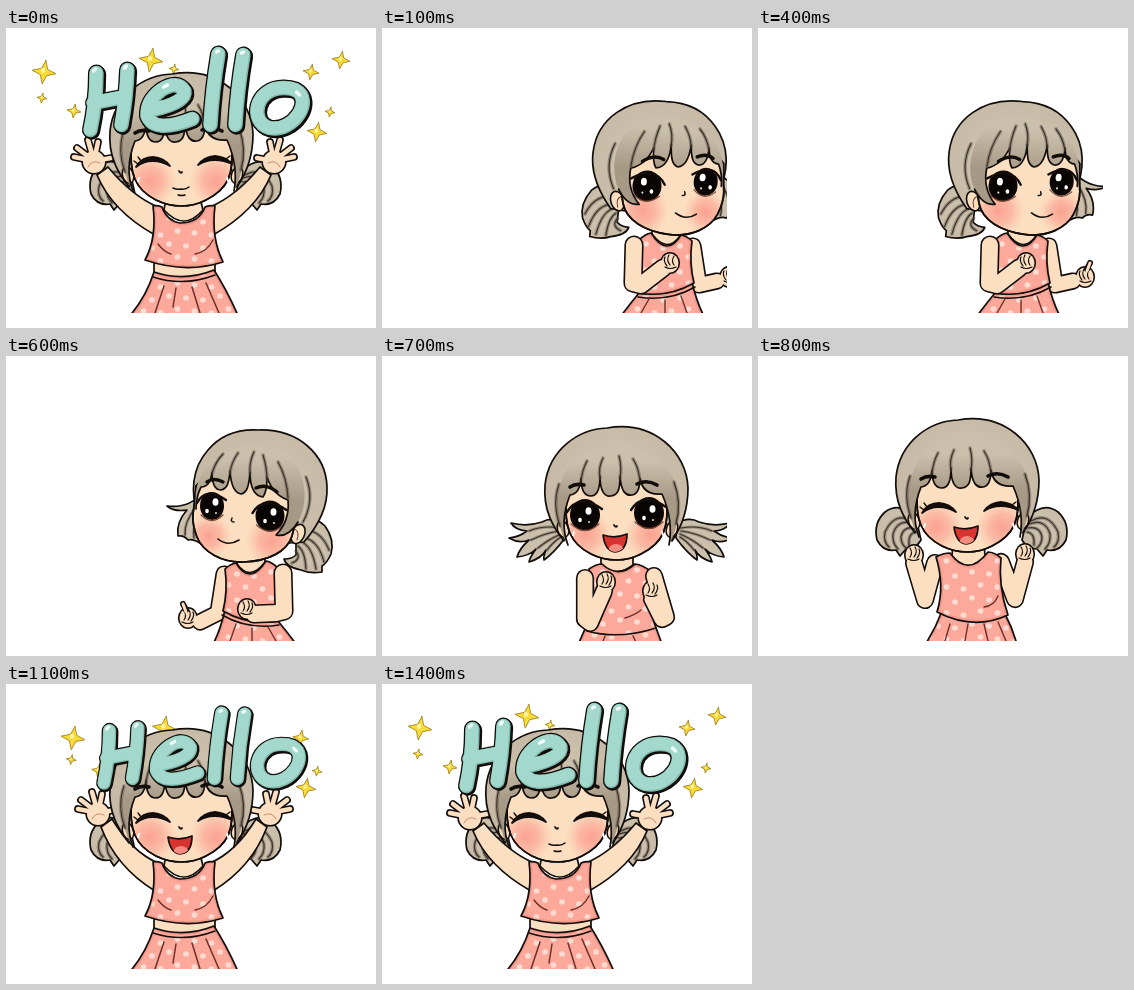
An HTML page with a canvas that plays this animation: 370x300 px, repeating every 2 s.

```html
<!DOCTYPE html>
<html lang="en">
<head>
<meta charset="utf-8">
<title>Hello</title>
<style>
html, body { margin: 0; width: 100%; height: 100%; overflow: hidden; background: #fff; }
canvas { display: block; width: 370px; height: 300px; }
</style>
</head>
<body>
<canvas id="stage" role="img" aria-label="A girl says Hello"></canvas>
<script>
const canvas = document.getElementById('stage');
const c = canvas.getContext('2d');
const dpr = window.devicePixelRatio || 1;
canvas.width = 370 * dpr;
canvas.height = 300 * dpr;

const INK = '#120d0a', SKIN = '#fcdfc1', PINK = '#fca99b', FOLD = '#6b3028';
const HAIR = '#cbc0ac', SHADE = '#a09482', STRAND = '#3c332b', MINT = '#a3d8cc';

function shape(d, fill, line = INK, w = 1.7) {
  const p = new Path2D(d);
  if (fill) { c.fillStyle = fill; c.fill(p); }
  if (line) { c.strokeStyle = line; c.lineWidth = w; c.stroke(p); }
}
const line = (d, w = 1.2, color = INK) => shape(d, null, color, w);

// A soft shadow with a fine dark core
function strands(d, soft = 3.6) {
  line(d, soft, 'rgba(85,74,62,.42)');
  line(d, 1.2, STRAND);
}

function oval(x, y, rx, ry, fill, ink, tilt = 0) {
  c.beginPath();
  c.ellipse(x, y, rx, ry, tilt, 0, 7);
  if (fill) { c.fillStyle = fill; c.fill(); }
  if (ink) { c.strokeStyle = ink; c.lineWidth = 1.6; c.stroke(); }
}

function group(draw, dx = 0, dy = 0) {
  c.save();
  c.translate(dx, dy);
  draw();
  c.restore();
}

function mirror(sum, draw) {
  c.save();
  c.transform(-1, 0, 0, 1, sum, 0);
  draw();
  c.restore();
}

function both(sum, draw) { draw(); mirror(sum, draw); }

function clipped(d, draw) {
  c.save();
  c.clip(new Path2D(d));
  draw();
  c.restore();
}

function hairTone(x, y, r) {
  const g = c.createRadialGradient(x, y, r * 0.55, x, y, r);
  g.addColorStop(0, HAIR);
  g.addColorStop(0.75, '#c6baa6');
  g.addColorStop(1, SHADE);
  return g;
}

function fringe(edge, rest, top, bottom) {
  const g = c.createLinearGradient(0, top, 0, bottom);
  g.addColorStop(0, HAIR);
  g.addColorStop(1, '#a69a86');
  shape(edge + rest, g, null);
  line(edge, 1.7);
}

function blush(x, y, r) {
  const g = c.createRadialGradient(x, y, 0, x, y, r);
  g.addColorStop(0, 'rgba(250,138,126,.72)');
  g.addColorStop(0.5, 'rgba(250,148,134,.5)');
  g.addColorStop(1, 'rgba(252,180,160,0)');
  oval(x, y, r, r, g);
}

function face(d, spots) {
  shape(d, SKIN);
  clipped(d, () => spots.forEach(s => blush(...s)));
  line(d, 1.7);
}

function cloth(d) {
  shape(d, PINK, null);
  clipped(d, () => {
    for (let row = 0; row < 9; row++)
      for (let col = 0; col < 18; col++)
        oval(112 + col * 17 + row % 2 * 8.5, 190 + row * 13 + col % 3 * 2, 2.9, 2.8, '#fddbd0');
    line(d, 5, 'rgba(222,110,98,.3)');
  });
  line(d, 1.7);
}

// Limbs are inked wide first, then filled with skin
function limb(pts, w, fist) {
  for (const [color, extra] of [[INK, 3.2], [SKIN, 0]]) {
    c.beginPath();
    pts.forEach(p => c.lineTo(...p));
    c.strokeStyle = color;
    c.lineWidth = w + extra;
    c.stroke();
    if (fist) oval(fist[0], fist[1], 8.5 + extra / 2, 9.5 + extra / 2, color);
  }
  if (!fist) return;
  group(() => {
    line('M-4 -7 Q-1 -2 -4 2 M1 -8 Q4 -3 0 2 M5 -6 Q7 -2 3 3 M-6 4 Q0 7 5 4', 1.2);
  }, ...fist);
}

function openEye(x, y, rx, ry) {
  const g = c.createRadialGradient(x, y - 2, rx * 0.6, x, y, ry);
  g.addColorStop(0, '#070403');
  g.addColorStop(0.8, '#0f0907');
  g.addColorStop(1, '#4a2b1e');
  oval(x, y, rx, ry - 1, g);
  oval(x + 3.5, y - 4, 3, 3.8, '#fff');
  oval(x - 5, y + 5, 1.8, 2.2, '#fff');
  oval(x + 4, y + 7, 1.1, 1.1, '#d8d0cc');
  line(`M${x - rx - 3} ${y - 3} Q${x - 6} ${y - ry - 5} ${x + rx + 2} ${y - 6}`, 2.4);
  line(`M${x - rx + 1} ${y + 9} Q${x} ${y + ry + 5} ${x + rx - 1} ${y + 9}`, 1.2, '#7a4a38');
}

function openMouth(x, y) {
  const d = `M${x - 12} ${y - 7} Q${x} ${y - 3} ${x + 12} ${y - 8} Q${x + 12} ${y + 9} ${x} ${y + 10} Q${x - 10} ${y + 9} ${x - 12} ${y - 7} Z`;
  shape(d, '#d8332f');
  clipped(d, () => oval(x + 1, y + 8, 7.5, 6, '#f58b80'));
}

/* ---------- front view ---------- */
function tail(fly) {
  if (fly) {
    group(() => {
      shape('M210 172 Q198 164 187 170 Q172 175 156 171 Q160 178 172 179 Q164 185 154 186 Q164 192 174 188 Q164 197 162 205 Q174 204 181 197 Q175 205 174 210 Q187 206 191 198 Q188 205 189 208 Q199 201 210 186 Z', HAIR);
      strands('M205 176 Q188 173 174 179 M205 179 Q190 181 176 188 M206 182 Q194 187 183 196 M206 185 Q198 190 192 198', 3);
    }, -52, -12);
    return;
  }
  shape('M158 162 Q142 145 127 156 Q115 167 119 184 Q125 196 138 194 L142 200 L148 193 Q158 193 163 184 Z', hairTone(142, 172, 29));
  strands('M154 165 Q137 155 127 176 Q125 186 131 191 M156 168 Q140 162 135 178 Q134 187 140 193 M157 172 Q145 170 143 181 Q143 188 148 192 M158 176 Q150 177 151 189');
}
const tails = fly => both(427, () => tail(fly));

function frontHead(open, smile) {
  shape('M157 177 C146 163 136 146 138 121 C142 85 172 65 200 64 C246 56 280 88 281 124 C281 147 274 164 265 177 Q262 142 210 138 Q160 142 157 177 Z', hairTone(210, 128, 80));
  both(421, () => {
    oval(156, 165, 5.5, 8.5, SKIN, INK, -0.3);
    line('M154 161 Q158 164 156 170', 1, FOLD);
  });
  face('M160 132 C156 164 164 180 184 190 C200 198 219 198 234 190 C256 179 263 164 259 132 C248 105 170 105 160 132 Z',
    [[178, 171, 27], [244, 171, 27]]);

  if (open) {
    openEye(178, 151, 15, 17);
    openEye(242, 149, 15, 17);
  } else {
    shape('M164 157 Q170 147 181 147 Q192 148 198 156 Q190 151 181 151 Q171 151 164 157 Z M226 155 Q232 147 243 146 Q254 147 260 154 Q252 150 243 150 Q233 150 226 155 Z', INK, INK, 1.8);
    line('M166 154 L162 151 M169 151 L166 147 M254 149 L258 146 M258 152 L262 149', 1.4);
  }
  line('M207 161 Q209 164 210 162', 1.8);
  if (smile) openMouth(208, 178);
  else line('M201 178 Q205 180 209 179 Q213 180 217 177 M206 185 Q210 186 213 185', 1.5);
  line('M167 168 l-1 3 M255 168 l1 3', 2, '#fff');

  const edge = 'M161 181 C154 163 157 146 163 131 Q173 130 174 114 C174 128 178 132 184 132 C190 132 193 126 193 112 C193 128 198 133 204 132 C211 131 213 126 213 112 C214 128 219 132 225 131 C231 130 233 124 233 114 C235 127 244 131 255 130 C263 148 265 165 262 181';
  fringe(edge, ' C276 155 276 122 258 101 Q236 84 210 84 Q184 84 162 102 C146 126 146 156 161 181 Z', 98, 134);
  strands('M174 118 Q175 106 180 97 M193 114 Q191 104 196 94 M213 114 Q215 103 212 92 M233 118 Q232 104 226 95 M153 162 Q145 140 152 120 M269 160 Q275 139 267 118');
  line('M163 123 Q169 119 177 121 M230 120 Q240 115 250 121', 3.6);
}

/* ---------- turned view, facing left ---------- */
function sideBack() {
  shape('M198 136 Q182 153 161 150 Q168 156 181 154 Q170 166 172 180 Q178 179 182 184 Q188 182 198 190 Z', HAIR);
  strands('M190 151 Q178 166 179 179 M194 158 Q186 170 188 182', 3);
  shape('M290 166 Q306 157 319 170 Q329 184 325 198 Q321 207 316 210 L316 216 Q304 218 295 214 Q280 211 278 203 Q286 203 290 199 Z', hairTone(303, 190, 31));
  strands('M294 181 Q312 182 318 206 M293 185 Q306 188 310 213 M292 190 Q299 195 300 213 M290 195 Q296 203 286 207 M298 174 Q315 174 323 194');
}

function sideHead() {
  shape('M192 160 C184 136 186 112 202 94 C218 75 238 73 253 74 C292 73 320 98 321 131 C322 153 311 171 298 186 L240 190 Z', hairTone(256, 138, 78));
  oval(292, 178, 6.5, 10, SKIN, INK, 0.4);
  line('M289 173 Q294 176 291 184', 1, FOLD);
  face('M190 130 Q189 145 187 158 Q186 168 191 181 C197 196 216 207 238 206 C262 205 281 196 286 180 C292 160 290 145 282 128 C255 108 208 108 190 130 Z',
    [[203, 180, 23], [266, 185, 27]]);
  openEye(206, 150, 12, 15);
  openEye(264, 160, 14.5, 16.5);
  line('M226 162 Q224 166 228 166', 1.5);
  line('M212 183 Q222 191 233 184', 1.6);

  const edge = 'M190 153 Q190 141 195 131 C202 131 205 126 206 116 C206 128 209 134 215 134 C221 133 223 127 224 115 C225 130 229 137 235 138 C241 137 243 130 244 116 C244 132 249 140 257 141 C260 137 261 130 261 121 Q267 139 282 144 Q284 165 270 179 Q282 182 292 166';
  fringe(edge, ' C304 145 300 112 278 96 Q244 84 212 100 Q186 118 190 153 Z', 102, 144);
  strands('M206 118 Q209 106 217 98 M224 117 Q225 107 232 97 M244 118 Q243 106 248 96 M261 124 Q261 112 257 99 M282 142 Q281 122 272 106 M297 166 Q309 144 300 121');
  line('M201 126 Q208 121 217 126 M250 132 Q260 127 271 136', 3.4);
}

function turned(farY, nearY, tilt, lift) {
  const head = draw => {
    c.save();
    c.translate(264, 160 - lift);
    c.rotate(tilt);
    c.translate(-264, -160);
    draw();
    c.restore();
  };
  head(sideBack);
  limb([[218, 218], [212, 257], [194, farY + 4]], 14, [182, farY]);
  line(`M180 ${farY - 8} l-3 -6`, 6);
  line(`M180 ${farY - 6} l-3 -8`, 3, SKIN);
  cloth('M219 254 Q243 270 272 265 Q282 277 293 292 L205 292 Q214 276 219 254 Z');
  shape('M231 190 L231 208 Q244 226 259 206 L259 190 Z', SKIN);
  cloth('M219 213 Q224 208 230 207 Q244 230 260 205 Q266 206 272 212 Q276 240 272 265 Q243 270 217 255 Q222 235 219 213 Z');
  line('M216 259 Q242 274 273 269', 1.6);
  line('M230 268 L224 285 M246 272 L246 285 M262 271 L270 285', 1.4, FOLD);
  limb([[277, 217], [278, 255], [270, 257], [248, nearY + 5]], 16, [241, nearY]);
  head(sideHead);
}

const left = dx => group(() => turned(262, 253, 0, 0), dx);
const right = dx => group(() => mirror(529, () => turned(249, 235, -0.1, 2)), dx);

/* ---------- front poses ---------- */
function bounce(dx, dy = 0) {
  group(() => {
    group(() => tails(true), 52, 12);
    shape('M246 200 L246 214 Q262 226 278 213 L278 200 Z', SKIN);
    cloth('M234 217 Q241 212 247 212 Q263 227 280 212 Q288 213 295 219 Q294 245 299 270 L308 295 L222 295 L234 268 Q238 240 234 217 Z');
    line('M232 279 Q264 288 301 276', 1.5);
    line('M250 284 l-3 8 M278 284 l4 8 M270 266 Q280 263 286 258', 1.4, FOLD);
    limb([[230, 226], [230, 267], [235, 271], [249, 239]], 15, [251, 230]);
    limb([[299, 224], [311, 265], [307, 267], [297, 247]], 15, [297, 239]);
    group(() => frontHead(true, true), 52, 12);
  }, dx, dy);
}

function cheer() {
  tails(false);
  limb([[177, 207], [167, 244], [156, 207]], 15, [156, 199]);
  limb([[243, 206], [257, 243], [267, 206]], 15, [267, 198]);
  cloth('M184 255 Q218 268 247 258 Q255 273 260 292 L165 292 Q177 274 184 255 Z');
  line('M192 268 L187 285 M210 268 L207 285 M226 268 L230 285 M240 266 L248 285', 1.4, FOLD);
  shape('M195 186 L194 200 Q210 219 227 200 L226 186 Z', SKIN);
  cloth('M178 201 Q185 197 192 197 Q210 222 230 196 Q236 196 243 202 Q240 230 250 259 Q216 275 179 256 Q187 230 178 201 Z');
  line('M240 240 Q236 250 226 251', 1.4, FOLD);
  frontHead(false, true);
}

const FINGERS = [[-20, -4], [-17, -13], [-6, -21], [4, -19], [17, -3]];
function raisedArm(dx, dy) {
  const x = 88 + dx, y = 133 + dy;
  const hand = (color, extra) => {
    c.strokeStyle = color;
    c.lineWidth = 4.6 + extra;
    for (const [fx, fy] of FINGERS) {
      c.beginPath();
      c.moveTo(x, y);
      c.lineTo(x + fx, y + fy);
      c.stroke();
    }
    oval(x, y + 1, 11 + extra / 2, 11 + extra / 2, color);
  };
  hand(INK, 3.2);
  shape(`M152 179 Q126 168 ${x + 14} ${y + 6} L${x + 3} ${y + 14} Q${x + 18} 183 149 207 Z`, SKIN);
  hand(SKIN, 0);
  line(`M${x - 6} ${y + 6} Q${x - 2} ${y - 2} ${x + 6} ${y + 2}`, 1, '#c98f70');
}

function armsUp(smile, dx, dy) {
  group(() => tails(false), -34, -18);
  both(356, () => raisedArm(dx, dy));
  shape('M148 232 L148 250 Q180 258 209 246 L209 230 Z', SKIN);
  cloth('M148 244 Q178 254 208 242 Q222 264 234 292 L120 292 Q139 272 148 244 Z');
  line('M147 249 Q178 259 209 247', 1.4);
  line('M158 258 L149 285 M170 260 L167 279 M186 259 L194 285 M200 255 L213 285', 1.5, FOLD);
  shape('M160 170 L158 182 Q178 204 197 182 L194 170 Z', SKIN);
  cloth('M147 178 Q151 177 156 179 Q161 193 174 195 Q193 195 199 179 Q204 177 209 178 Q205 210 217 234 Q180 246 139 232 Q151 210 147 178 Z');
  line('M207 212 Q201 224 189 226 M152 216 Q158 224 165 226', 1.4, FOLD);
  group(() => frontHead(false, smile), -34, -18);
}

/* ---------- lettering and sparkles ---------- */
const WORD = new Path2D('M91 43 Q91 72 85 100 M122 40 Q121 68 116 95 M88 73 L119 67 M147 80 Q181 73 179 61 Q172 50 156 60 Q141 71 142 86 Q149 104 187 89 M213 24 Q207 60 205 95 M238 25 Q232 60 230 95 M279 58 C250 57 243 92 264 98 C288 103 309 70 290 60 Q285 58 279 58');
function hello(scale) {
  c.save();
  c.translate(196 - 5 * (scale - 0.92) / 0.08, 66);
  c.scale(scale, scale);
  c.translate(-191.5, -64);
  const layers = [[1.2, 1.2, INK, 17], [0, 0, INK, 17], [0, 0, '#83b9ad', 14.4], [-0.5, -0.5, MINT, 12.6]];
  for (const [dx, dy, color, w] of layers) {
    group(() => {
      c.strokeStyle = color;
      c.lineWidth = w;
      c.stroke(WORD);
    }, dx, dy);
  }
  line('M88 41 l2 -2 M119 38 l2 -2 M158 57 l4 -2 M211 22 l2 -1 M236 23 l2 -1 M291 62 l3 3', 3.4, '#f4fffb');
  c.restore();
}

const STARS = [[38, 44, 12], [36, 70, 5], [68, 83, 7], [145, 32, 12], [168, 41, 5], [305, 44, 8], [335, 32, 9], [311, 104, 10], [324, 84, 5]];
function sparkles(near) {
  for (const [sx, sy, r] of STARS) {
    if (near && sx === 335) continue;
    const x = near ? sx * 0.853 + 34.6 : sx;
    const y = near ? sy * 0.833 + 17.3 : sy;
    c.save();
    c.translate(x, y);
    c.rotate(0.15);
    c.beginPath();
    for (let i = 0; i < 8; i++) {
      const a = i * Math.PI / 4, d = i % 2 ? r * 0.38 : r;
      c.lineTo(Math.sin(a) * d, -Math.cos(a) * d);
    }
    c.closePath();
    c.fillStyle = '#f9db35';
    c.fill();
    c.strokeStyle = '#a88a2c';
    c.lineWidth = 0.9;
    c.stroke();
    oval(-r * 0.1, -r * 0.12, r * 0.18, r * 0.22, '#fff3a0');
    c.restore();
  }
}

function greet() {
  sparkles(false);
  armsUp(false, 0, 0);
  hello(1);
}

const SCENES = [
  [0, greet],
  [100, () => right(0)],
  [200, () => bounce(9)],
  [300, () => bounce(0)],
  [400, () => right(-20)],
  [500, () => bounce(-3)],
  [600, () => left(0)],
  [700, () => bounce(-27, -4)],
  [800, cheer],
  [1000, () => { armsUp(true, 6, -2); hello(0.84); }],
  [1100, () => { sparkles(true); armsUp(true, 4, -4); hello(0.92); }],
  [1400, greet]
];

function frame() {
  const t = performance.now() % 2000;
  c.setTransform(dpr, 0, 0, dpr, 0, 0);
  c.fillStyle = '#fff';
  c.fillRect(0, 0, 370, 300);
  c.lineCap = c.lineJoin = 'round';
  c.save();
  c.beginPath();
  c.rect(0, 0, 345, 285);
  c.clip();
  SCENES.filter(s => s[0] <= t).pop()[1]();
  c.restore();
  requestAnimationFrame(frame);
}
frame();
</script>
</body>
</html>
```
